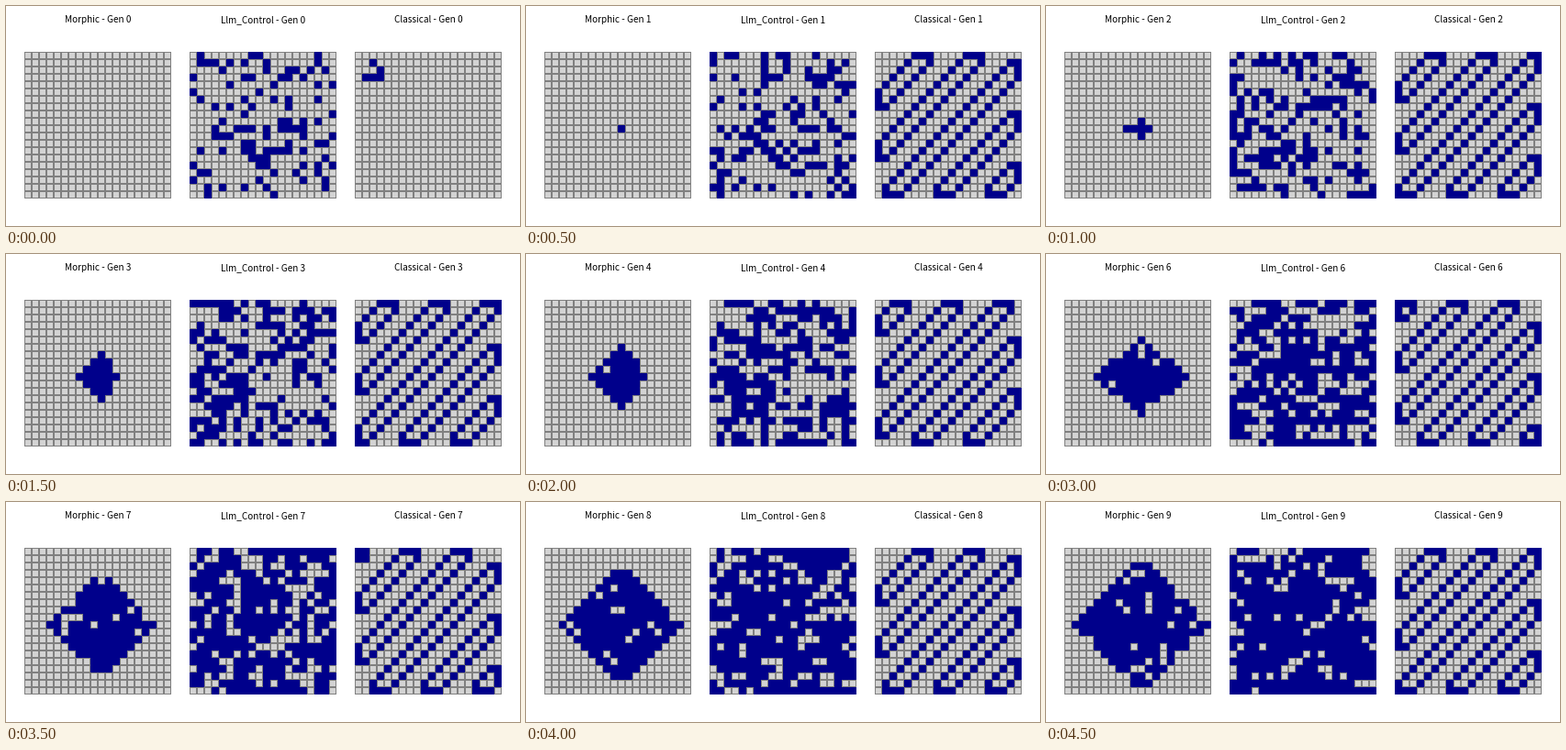
These frames come from a looping animation (560x240 px, 5000 ms). A matplotlib script:

```python
import numpy as np
import matplotlib.pyplot as plt
from matplotlib.animation import FuncAnimation

W, H, DPI = 560, 240, 100
N, CELL, TOP = 20, 8, 50
GENS, STEP_MS = 10, 500
PANELS = (("Morphic", 20), ("Llm_Control", 200), ("Classical", 380))
ALIVE, DEAD, LINE = (0, 0, 139), (211, 211, 211), (128, 128, 128)

ROWS, COLS = np.mgrid[:N, :N]
MID = N // 2


def neighbours(grid):
    """Count live neighbours; everything beyond the border is dead."""
    p = np.pad(grid.astype(int), 1)
    total = sum(p[r:r + N, c:c + N] for r in range(3) for c in range(3))
    return total - grid


def life_step(grid):
    n = neighbours(grid)
    return (n == 3) | (grid & (n == 2))


def morphic(gen):
    """Diamond that spreads from the centre, with scattered gaps."""
    grid = np.zeros((N, N), bool)
    if gen == 0:
        return grid
    age = gen - 1
    reach = round(8 * (age / 8) ** 0.82)
    left, right = np.ceil(1.1 * age), np.round(1.15 * age)
    tip = gen // 7
    off = np.abs(ROWS - MID)
    taper = 1 - off / max(reach, 1)
    lo = np.round(MID - tip - (left - tip) * taper)
    hi = np.round(MID + tip + (right - tip) * taper)
    grid = (off <= reach) & (COLS >= lo) & (COLS <= hi)
    noise = np.random.default_rng(gen).random((N, N))
    gaps = (noise < 0.018 * age) & (neighbours(grid) > 4)
    return grid & ~gaps


def classical(gen):
    """A glider first, then one life step of drifting diagonal bands."""
    if gen == 0:
        grid = np.zeros((N, N), bool)
        grid[1, 2] = grid[2, 3] = True
        grid[3, 1:4] = True
        return grid
    return life_step((ROWS + COLS + gen) % 7 < 2)


def control_run():
    """Random soup that thickens from one generation to the next."""
    rng = np.random.default_rng(12)
    score = rng.random((N, N))
    run = []
    for gen in range(GENS):
        grid = score > np.quantile(score, 0.75 - 0.061 * gen)
        run.append(grid)
        p = np.pad(grid.astype(float), ((0, 0), (1, 1)))
        beside = (p[:, :-2] + p[:, 2:]) / 2
        score = 0.2 * grid + 0.3 * beside + rng.random((N, N))
    return run


SOUP = control_run()


def paint(grid):
    big = np.kron(grid, np.ones((CELL, CELL), int)).astype(bool)
    edge = np.isin(np.arange(N * CELL) % CELL, (0, CELL - 1))
    tile = np.full((N * CELL, N * CELL, 3), DEAD, np.uint8)
    tile[edge[:, None] | edge[None, :]] = LINE
    tile[big] = ALIVE
    return tile


def stage(gen):
    img = np.full((H, W, 3), 255, np.uint8)
    grids = (morphic(gen), SOUP[gen], classical(gen))
    for (_, x), grid in zip(PANELS, grids):
        img[TOP:TOP + N * CELL, x:x + N * CELL] = paint(grid)
    return img


fig = plt.figure(figsize=(W / DPI, H / DPI), dpi=DPI, facecolor="white")
ax = fig.add_axes([0, 0, 1, 1])
ax.axis("off")
view = ax.imshow(stage(0), extent=(0, W, H, 0), interpolation="nearest",
                 aspect="auto")
titles = [ax.text(x + N * CELL / 2, 18, "", ha="center", va="baseline",
                  family="Noto Sans CJK JP", size=10 * 72 / DPI,
                  color="black")
          for _, x in PANELS]


def update(gen):
    view.set_data(stage(gen))
    for title, (name, _) in zip(titles, PANELS):
        title.set_text(f"{name} - Gen {gen}")
    return [view, *titles]


anim = FuncAnimation(fig, update, frames=GENS, interval=STEP_MS,
                     init_func=lambda: update(0), repeat=True, repeat_delay=0)
plt.show()
```
